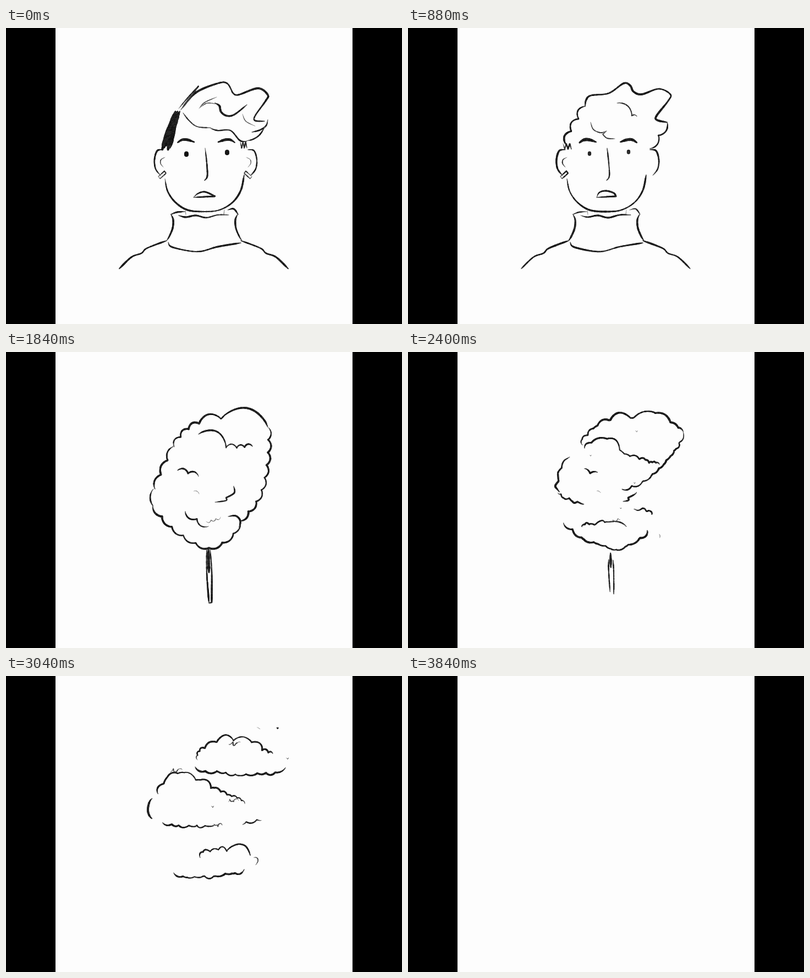
Write an HTML page with a canvas that moves like this. It is 720 by 540 pixels and loops after 4 s.

```html
<!DOCTYPE html>
<html lang="en">
<head>
<meta charset="utf-8">
<title>Face to clouds</title>
<style>
html, body { margin: 0; width: 100%; height: 100%; overflow: hidden; background: #000; }
canvas { display: block; }
</style>
</head>
<body>
<canvas id="stage" width="720" height="540"></canvas>
<script>
const N = 160;
const mix = (a, b, u) => a + (b - a) * u;
const dist = (a, b) => Math.hypot(b[0] - a[0], b[1] - a[1]);

function random(seed) {
  return () => {
    seed = (seed * 1664525 + 1013904223) >>> 0;
    return seed / 4294967296;
  };
}

// N + 1 points at even distances along a line.
function resample(line) {
  const sum = [0];
  for (let i = 1; i < line.length; i++) sum.push(sum[i - 1] + dist(line[i - 1], line[i]));
  const total = sum[sum.length - 1], pts = [];
  for (let n = 0, i = 1; n <= N; n++) {
    const d = total * n / N;
    while (i < line.length - 1 && sum[i] < d) i++;
    const u = (d - sum[i - 1]) / (sum[i] - sum[i - 1] || 1);
    pts.push([0, 1].map(c => mix(line[i - 1][c], line[i][c], u)));
  }
  return pts;
}

// Smooth stroke through "x,y" points; "/" marks a sharp corner.
function curve(w, text) {
  const words = text.split(" "), line = [];
  const p = words.map(s => s.replace("/", "").split(",").map(Number));
  const sharp = i => !p[i - 1] || !p[i + 1] || words[i][0] === "/";
  for (let i = 0; i < p.length - 1; i++) {
    const a = p[i], b = p[i + 1];
    const before = sharp(i) ? a : p[i - 1], after = sharp(i + 1) ? b : p[i + 2];
    for (let t = 0; t <= 1; t += 1 / 16) {
      line.push([0, 1].map(c => a[c] + .5 * t * (b[c] - before[c]
        + t * (2 * before[c] - 5 * a[c] + 4 * b[c] - after[c]
        + t * (3 * a[c] - before[c] - 3 * b[c] + after[c])))));
    }
  }
  return { w, pts: resample(line) };
}

// n round bumps along a guide curve, biggest near the share "peak" of its length.
function puffs(w, n, bulge, text, peak) {
  const guide = curve(w, text).pts, line = [];
  const size = Array.from({ length: n }, (_, i) =>
    peak === undefined ? 1 : .3 + Math.exp(-((((i + .5) / n - peak) / .22) ** 2)));
  const total = size.reduce((a, b) => a + b);
  let at = 0;
  for (const s of size) {
    const a = guide[Math.round(at / total * N)];
    const b = guide[Math.round((at += s) / total * N)];
    for (let i = 0; i <= 16; i++) {
      const h = bulge * Math.abs(Math.sin(Math.PI * i / 16)) ** .75;
      line.push([mix(a[0], b[0], i / 16) + (b[1] - a[1]) * h,
                 mix(a[1], b[1], i / 16) - (b[0] - a[0]) * h]);
    }
  }
  return { w, pts: resample(line) };
}

const mirror = (s, axis) => ({ w: s.w, pts: s.pts.map(([x, y]) => [2 * axis - x, y]) });
const dot = (w, x, y) => curve(w, `${x},${y - 1} ${x},${y + 1}`);

function zigzag(x, y, n, step, height) {
  const at = i => `/${x + i * step},${y + (i % 2) * height}`;
  return curve(1.9, Array.from({ length: n }, (_, i) => at(i)).join(" "));
}

function bird(w, x, y, s) {
  return curve(w, `${x - s},${y - s * .2} ${x - s * .5},${y - s * .5} /${x},${y} ${x + s * .35},${y - s * .5} ${x + s},${y - s * .5}`);
}

function flock(list, w, rise = 0) {
  return Object.fromEntries(list.map(([x, y, s], i) => ["bird" + i, bird(w, x, y - rise, s)]));
}

function hatch(n) {
  return Object.fromEntries(Array.from({ length: n }, (_, i) => ["hatch" + i,
    curve(4.6, `${308 + 2 * i},${152 + i % 2} ${293 + 3.5 * i},${188 - 2 * i} ${284 + 3.5 * i},${222 - 4 * (i % 3)}`)]));
}

const earL = curve(2.2, "286,222 275,224 270,240 272,257 281,269");
const lobe = curve(1.2, "289,236 282,240 281,247 286,254");
const ring = curve(1.6, "/277,271 /288,261 /291,265 /280,275 /277,271");
const brow = curve(4.4, "312,209 320,204 330,204 342,208");
const collar = curve(2.2, "300,340 304,350 303,365 297,380 292,388");
const neck = curve(1.1, "326,331 327,341");
const arm = curve(2.3, "292,388 270,396 254,403 246,411 228,418 206,439");

const person = {
  earL, lobeL: lobe, ringL: ring,
  earR: mirror(earL, 363),
  browL: brow, browR: mirror(brow, 364),
  nose: curve(2.1, "362,219 365,246 366,270 361,278"),
  face: curve(2.1, "289,275 294,298 308,318 330,332 360,335 388,332 412,318 427,296 433,268"),
  neckL: neck, neckR: mirror(neck, 361.5),
  lipL: curve(2, "326,335 311,336 300,340"),
  lipR: curve(2, "403,332 414,330 422,340"),
  lip: curve(2, "314,342 327,345 345,342 364,346 385,341 405,341"),
  colL: collar, colR: mirror(collar, 360.5),
  hem: curve(2.1, "295,391 303,400 348,408 385,399 427,392"),
  armL: arm, armR: mirror(arm, 359.5)
};

const face = {
  ...person, ...hatch(5),
  top: curve(2.4, "318,149 345,118 385,101 402,101 /412,118 422,122 458,110 476,122 472,133 453,160 453,169 470,170"),
  spike: curve(1.4, "314,147 329,129 /350,106 338,123 318,149"),
  right: curve(1.7, "476,167 473,178 462,186 447,190"),
  tuft: curve(1.5, "471,180 461,195 449,203 437,206"),
  in1: curve(2.4, "380,137 388,142 391,153 401,160 415,158 438,140"),
  wisp: curve(1, "351,147 361,136 383,126"),
  wisp2: curve(1, "353,145 366,137 384,139"),
  wisp3: curve(1, "430,157 436,170 453,179"),
  low: curve(1.7, "322,155 333,169 348,180 373,182"),
  fringe: curve(2.1, "372,183 385,187 408,187 425,205 437,207"),
  burn: zigzag(426, 208, 6, 2.4, 11),
  lobeR: mirror(lobe, 363), ringR: mirror(ring, 362),
  eyeL: dot(6.3, 328, 230), eyeR: dot(6.3, 402, 227),
  mouth: curve(1.9, "/341,309 349,302 362,299 /380,307 /341,309")
};

const puffy = {
  ...person,
  top: curve(2.4, "322,143 324,131 333,123 365,119 392,101 404,105 410,116 425,121 456,111 477,121 473,133 452,160 453,168 471,172"),
  right: puffs(2.3, 2, .25, "471,172 452,201 440,220"),
  side: puffs(2.4, 3, -.32, "322,143 314,160 298,187 287,212"),
  in1: puffs(1.9, 2, .25, "380,137 393,157 416,161", .2),
  low: curve(1.7, "332,172 337,185 350,191 361,188"),
  fringe: curve(1.8, "361,188 /354,194 362,201 376,202"),
  burn: zigzag(282, 211, 6, 3, 10),
  eyeL: dot(5, 330, 229), eyeR: dot(5, 401, 226),
  mouth: curve(1.9, "/343,309 348,300 360,297 374,301 /378,307 /343,309")
};

const drip = curve(2.3, "312,345 310,357 320,370 318,386 327,401 350,420");
const lump = {
  top: puffs(2.3, 4, .27, "317,153 365,122 425,119 470,171 473,235"),
  right: puffs(2.2, 1, .36, "475,237 434,281"),
  side: puffs(2.3, 2, -.2, "317,155 288,194 273,234"),
  earL: puffs(2.2, 1, -.27, "276,237 274,277"),
  face: puffs(2.3, 6, -.2, "279,281 320,330 341,352 379,371 417,338 434,296"),
  earR: curve(1.3, "421,290 425,297 432,294 437,281"),
  in1: puffs(2.3, 2, .34, "366,181 395,190 434,197"),
  in3: puffs(2.1, 2, .26, "278,258 311,268 336,262"),
  in2: puffs(1.7, 1, -.28, "386,302 415,306"),
  eyeL: dot(7, 330, 227),
  nose: curve(2, "368,253 369,264 365,276"),
  mouth: curve(1.9, "361,304 365,299 370,304 365,309 361,304"),
  lobeR: puffs(1, 1, .5, "428,238 434,249"),
  colL: drip, colR: mirror(drip, 372)
};

const candy = {
  top: puffs(2.4, 5, .32, "306,173 327,145 357,129 416,121 476,137", .95),
  right: puffs(2.2, 8, .25, "476,137 475,195 460,263 425,308"),
  side: puffs(2.2, 3, -.24, "306,172 283,222 271,250"),
  earL: puffs(2, 1, -.18, "268,250 267,280"),
  face: puffs(2.3, 8, -.22, "267,280 302,319 345,348 372,357 409,336 425,308"),
  earR: curve(2.1, "404,300 418,299 426,308 424,320"),
  in1: puffs(2, 4, .34, "350,150 398,174 448,172", .05),
  in3: puffs(2, 2, .3, "312,216 350,227"),
  in4: curve(2, "414,245 415,257 /400,266 400,271 380,274"),
  in2: puffs(2, 2, -.28, "326,291 350,306 368,318"),
  curl: puffs(.9, 3, -.4, "364,309 390,301"),
  lobeR: puffs(.9, 1, .25, "341,254 351,259"),
  stickL: curve(2.1, "365,359 365,402 369,457"),
  stickR: curve(2.1, "371,359 374,400 /374,457 369,458"),
  core: curve(4.4, "368,358 369,402")
};

const clouds = {
  top: puffs(2.4, 9, .34, "335,168 342,147 376,124 420,120 478,126 505,149 540,160", .56),
  right: puffs(2.2, 9, .24, "540,160 524,168 463,179 400,176 335,167"),
  side: curve(2.5, "278,218 263,226 258,245 264,259 278,264"),
  in1: puffs(2.1, 10, .34, "278,217 284,204 320,179 359,191 384,220 432,236 474,256", .25),
  earL: puffs(2.2, 6, -.24, "278,264 316,272 395,272"),
  earR: puffs(1.6, 3, -.22, "418,269 452,263 474,256"),
  in2: puffs(2.2, 5, .36, "302,357 309,342 353,324 384,319 437,318", 1),
  face: puffs(2.3, 7, -.24, "303,358 365,361 450,348"),
  nub: curve(1.4, "444,333 455,331 458,338 450,350"),
  ...flock([[416, 146, 11], [332, 190, 9], [412, 240, 10], [387, 286, 8]], 1.6)
};

const birds = [[416, 97, 7], [275, 154, 11], [414, 216, 8], [382, 258, 9],
  [494, 96, 7], [512, 152, 13], [376, 240, 13]];
const sky = {
  top: puffs(1.3, 3, .3, "365,133 378,122 405,112", .5),
  arc: curve(1.2, "445,96 454,93 463,98 466,108"),
  right: puffs(2.2, 4, .2, "461,181 430,175 378,173 361,166"),
  in1: puffs(1.9, 6, .32, "277,210 284,190 313,178 355,186 372,201"),
  earL: puffs(1.9, 3, -.34, "295,269 354,269"),
  face: puffs(2, 5, -.26, "307,364 357,370 411,361"),
  in2: curve(1.5, "426,294 438,293 450,310 /447,329 458,328 457,338"),
  ...flock(birds, 1.6)
};
const gone = flock(birds, 0, 44);

const poses = [[0, face], [4, puffy], [8, lump], [12, candy], [17, clouds], [22, sky], [26, gone]];
const ctx = document.getElementById("stage").getContext("2d");
ctx.lineCap = "round";

// Pencil line with soft ends and an uneven weight; "part" is the share left around its middle.
function ink({ w, pts }, part, seed) {
  if (w < .2 || part <= 0) return;
  const rnd = random(seed * 7919 + 17), phase = rnd() * 6;
  const from = Math.round(N * (1 - part) / 2), count = N - 2 * from;
  const total = pts.slice(1).reduce((sum, p, i) => sum + dist(pts[i], p), 0) * part;
  const stride = Math.max(1, Math.round(1.5 * count / (total + .1)));
  for (let i = 0; i < count; i += stride) {
    const d = total * i / count, isDot = total < 4;
    const soft = isDot ? 1 : .45 + .55 * Math.min(1, d / 10, (total - d) / 10);
    const grain = isDot ? 1 : 1 + .22 * Math.sin(d * .05 + phase) + (rnd() - .5) * .25;
    const width = w * 1.25 * soft * grain;
    const shade = 16 + Math.max(0, 2.2 - width) * 60 + rnd() * 30;
    ctx.strokeStyle = `rgb(${shade},${shade},${shade})`;
    ctx.lineWidth = width;
    ctx.beginPath();
    ctx.moveTo(...pts[from + i]);
    ctx.lineTo(...pts[from + Math.min(count, i + stride)]);
    ctx.stroke();
  }
}

// Between two poses the line also wavers a little, as if redrawn by hand.
function morph(a, b, u, seed) {
  const sway = 1.5 * Math.sin(Math.PI * u);
  return {
    w: mix(a.w, b.w, u),
    pts: a.pts.map(([x, y], i) => [
      mix(x, b.pts[i][0], u) + sway * Math.sin(i * .09 + seed),
      mix(y, b.pts[i][1], u) + sway * Math.cos(i * .11 + seed)
    ])
  };
}

function draw(step) {
  ctx.fillStyle = "#000";
  ctx.fillRect(0, 0, 720, 540);
  ctx.fillStyle = "#fdfdfd";
  ctx.fillRect(90, 0, 540, 540);
  let k = 0;
  while (k < poses.length - 2 && poses[k + 1][0] <= step) k++;
  const [s0, a] = poses[k], [s1, b] = poses[k + 1];
  const u = (step - s0) / (s1 - s0);
  let seed = step * 50;
  for (const name of new Set([...Object.keys(a), ...Object.keys(b)])) {
    seed++;
    if (a[name] && b[name]) ink(morph(a[name], b[name], u, seed), 1, seed);
    else if (a[name]) ink(a[name], 1 - u, seed);
    else ink(b[name], (u - .25) / .75, seed);
  }
}

// Drawings last 120 ms on an 80 ms grid, with longer rests on the face and the candy.
function stepAt(t) {
  const q = Math.floor(t / 80) * 80;
  return Math.max(0, Math.min(12, Math.floor((q - 360) / 120)), Math.floor((q - 720) / 120));
}

let shown = -1;
function tick() {
  const step = stepAt(performance.now() % 4000);
  if (step !== shown) draw(shown = step);
  requestAnimationFrame(tick);
}
tick();
</script>
</body>
</html>
```
